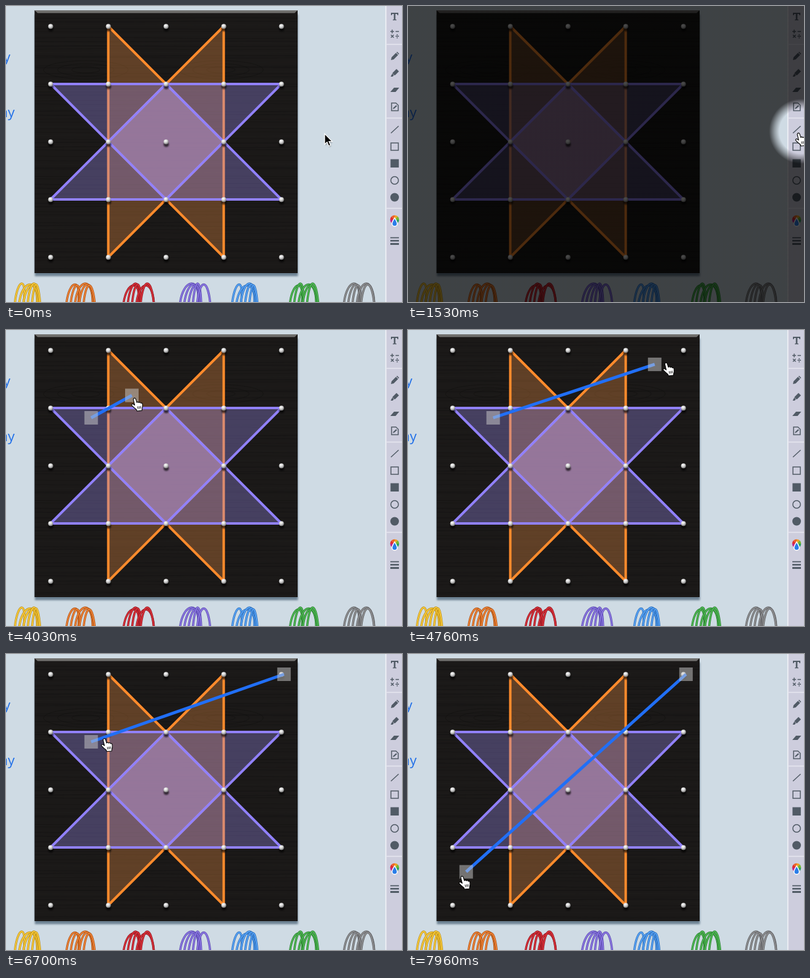
These frames come from a looping animation (645x482 px, 8 s). An HTML page:

```html
<!DOCTYPE html>
<html lang="en">
<head>
<meta charset="utf-8">
<title>Geoboard line tool</title>
<style>
html, body { margin: 0; width: 100%; height: 100%; overflow: hidden; background: #cfdbe4; }
svg { position: absolute; left: 0; top: 0; display: block; }
.label { font: 22px "Open Sans", sans-serif; fill: #1f6ee8; text-anchor: end; }
.solid { fill: #515b66; }
.outline { fill: none; stroke: #515b66; stroke-width: 1.5; }
.handle { fill: #cdcdcd; fill-opacity: .5; }
.orange { fill: #ff9d4b; fill-opacity: .3; stroke: #ff8b2c; stroke-width: 4; stroke-linejoin: round; }
.purple { fill: #988bea; fill-opacity: .34; }
.purpleEdge { fill: none; stroke: #9181fb; stroke-width: 4; stroke-linejoin: round; }
</style>
</head>
<body>
<svg id="stage" width="645" height="482" viewBox="0 0 645 482">
  <defs>
    <radialGradient id="pin" cx=".4" cy=".3" r=".7">
      <stop offset="0" stop-color="#fff"/>
      <stop offset=".5" stop-color="#d2d2d2"/>
      <stop offset="1" stop-color="#777"/>
    </radialGradient>
    <radialGradient id="spot" gradientUnits="userSpaceOnUse" cx="0" cy="0" r="53">
      <stop offset=".68" stop-color="#000" stop-opacity="0"/>
      <stop offset=".83" stop-color="#000" stop-opacity=".3"/>
      <stop offset="1" stop-color="#000" stop-opacity=".7"/>
    </radialGradient>
    <filter id="soft" x="-20%" y="-20%" width="140%" height="140%"><feGaussianBlur stdDeviation="1.4"/></filter>
    <filter id="blur" x="-50%" y="-50%" width="200%" height="200%"><feGaussianBlur stdDeviation="1.2"/></filter>
    <clipPath id="boardClip"><path d="M47 12H475V435H47Z"/></clipPath>
  </defs>

  <rect width="645" height="482" fill="#cfdbe4"/>
  <text class="label" x="7" y="90.5">y</text>
  <text class="label" x="14" y="181">ay</text>

  <rect x="47" y="14" width="428.5" height="426" fill="#5d7385" opacity=".85" filter="url(#soft)"/>
  <rect x="46.5" y="7" width="428.5" height="428" fill="#1b1918"/>
  <path d="M46.5 7H475L470 11.5H51.5Z" fill="#706f6d"/>
  <g id="grain" clip-path="url(#boardClip)" fill="none"></g>

  <g transform="translate(-.4 0)">
    <path class="orange" d="M167 33V409L355 221Z"/>
    <path class="orange" d="M355 33V409L167 221Z"/>
    <path class="purple" d="M73 127H449L261 315Z"/>
    <path class="purple" d="M73 315H449L261 127Z"/>
    <path class="purpleEdge" d="M73 127H449L261 315ZM73 315H449L261 127Z"/>
  </g>
  <g id="pins"></g>
  <g id="bands" fill="none"></g>

  <rect x="619" width="26" height="482" fill="#cdcddd"/>
  <path d="M618.7 0V482" stroke="#f2f4f8" stroke-width="1.6"/>
  <path d="M620 62.5H645M620 182.5H645M620 329.5H645" stroke="#e6e6f0" stroke-width="1.4"/>
  <g id="tools">
    <path class="solid" d="M627 11H639V15H637.6L637 13H634.3V21.8L636 22.2V23.3H630V22.2L631.7 21.8V13H629L628.4 15H627Z"/>
    <path class="outline" d="M626 41.5H632M629 38.5V44.5M634.5 41.5H640M627 47L631.5 51.5M631.5 47L627 51.5M634.5 49.3H640"/>
    <path class="solid" d="M636.3 46h1.8v1.5h-1.8zM636.3 51h1.8v1.5h-1.8z"/>
    <path class="solid" d="M627 88L628 83.5L635.2 76.3L638.7 79.8L631.5 87ZM636 75.5L637.2 74.6L640.3 77.8L639.4 79Z"/>
    <path class="solid" d="M626.5 115L630 108.5L636 102.5L640 106.5L634 112.5L631 113.3L630 115Z"/>
    <path d="M629 109.5L633 113.5" stroke="#cdcddd" stroke-width=".7"/>
    <path class="solid" d="M626 140L632 133H640.5L634.5 140Z"/>
    <path class="outline" d="M628 158H635L638.8 161.5V170.5H628Z"/>
    <path class="solid" d="M630 168L631 165.5L635.5 161.5L637 163L632.5 167Z"/>
    <path class="outline" d="M627 207L639.5 195.5"/>
    <rect class="outline" x="627" y="223" width="12" height="12"/>
    <rect class="solid" x="626.3" y="249.5" width="13.5" height="13.5"/>
    <circle class="outline" cx="633" cy="284" r="6.2"/>
    <circle class="solid" cx="633" cy="311.5" r="7"/>
    <g id="wheel"></g>
    <path d="M633 345C635 348.5 637.3 351.5 637.3 354.5A4.3 4.3 0 0 1 628.7 354.5C628.7 351.5 631 348.5 633 345Z" fill="#2a7de8" stroke="#fff" stroke-width="1.5"/>
    <path class="solid" d="M626 376.5h14v1.8h-14zM626 381h14v2.6h-14zM626 386h14v3h-14z"/>
  </g>

  <g id="line">
    <path id="segment" fill="none" stroke="#216ff6" stroke-width="5"/>
    <rect id="tail" class="handle" x="-11" y="-11" width="22" height="22"/>
    <rect id="head" class="handle" x="-11" y="-11" width="22" height="22"/>
  </g>

  <g id="arrow">
    <path d="M1 2V19L5 15.5L7.5 21.5L10.5 20L8 14.5H13Z" fill="#000" opacity=".35" filter="url(#blur)"/>
    <path d="M0 0V17.3L4 13.7L6.6 20L9.7 18.7L7.1 12.6H12.4Z" fill="#000" stroke="#fff" stroke-width="1.3"/>
  </g>
  <g id="hand">
    <path d="M-2 2C-1.8 -.6 1.2 -.8 2 1.4L3.8 7.2C4.4 5.7 6.6 5.8 7 7.4C7.9 6.2 9.8 6.6 10.2 8.2C11.4 7.4 12.8 8.2 12.9 9.7C13.3 12.4 13.3 14.4 12.4 17L12 20.2L4 21L3 18.5C1 17 -2 14.5 -4.4 11.8C-5.4 10.2 -3.5 8.8 -2 9.8L.3 11.4Z" fill="#fff" stroke="#000" stroke-width="1.1" stroke-linejoin="round"/>
    <path d="M5 13.5L5.8 17.5M7.5 13.2L8 17.2M9.8 12.8L10.1 16.8" stroke="#000" stroke-width=".9"/>
  </g>
  <rect id="dim" x="-700" y="-600" width="1400" height="1200" fill="url(#spot)"/>
</svg>
<script>
const $ = id => document.getElementById(id);
const add = (parent, tag, attrs) => {
  const el = document.createElementNS('http://www.w3.org/2000/svg', tag);
  for (const key in attrs) el.setAttribute(key, attrs[key]);
  $(parent).appendChild(el);
};

let seed = 7;
const rand = () => (seed = seed * 16807 % 2147483647) / 2147483647;

// Wood grain with two faint knots
for (let i = 0; i < 85; i++) {
  const y = 14 + i * 5 + rand() * 4, bend = rand() * 5 - 2.5;
  add('grain', 'path', {
    d: `M47 ${y}q107 ${bend} 214 0t214 0`,
    stroke: i % 3 ? '#11100f' : '#22201e', 'stroke-width': .6 + rand(), opacity: .35
  });
}
for (const x of [130, 350]) for (let i = 1; i < 4; i++)
  add('grain', 'ellipse', { cx: x, cy: 104, rx: 23 * i, ry: 5 * i, stroke: '#11100f', opacity: .5 });

for (let y = 33; y < 420; y += 94) for (let x = 73; x < 460; x += 94) {
  add('pins', 'ellipse', { cx: x, cy: y + 4.5, rx: 4.4, ry: 4, fill: '#000', opacity: .65, filter: 'url(#blur)' });
  add('pins', 'circle', { cx: x - .3, cy: y + .2, r: 4, fill: 'url(#pin)' });
}

// Rubber bands: [centre, colour, shade]
const bands = [
  [39, '#f8cb3c', '#b98a12'], [123, '#ee8236', '#a84f12'], [216, '#d83039', '#8f1720'],
  [308, '#8a76e2', '#5544a8'], [393, '#58a3f6', '#2769b4'], [487, '#4fb954', '#267a2b'],
  [575, '#8d8e90', '#5c5d60']
];
bands.forEach(([x, colour, shade], n) => {
  for (let i = 0; i < 5; i++) {
    const left = x - 25 + i * 7;
    const right = Math.min(x + 25, left + 14 + (i * 3 + n) % 4 * 5);
    const top = 441 + (i + n) % 3 * 2;
    const d = `M${left} 488C${left + 4} ${top} ${right + 8 - i * 3} ${top - 2} ${right} 488`;
    add('bands', 'path', { d, stroke: shade, 'stroke-width': 3.4 });
    add('bands', 'path', { d, stroke: colour, 'stroke-width': 2 });
  }
});

['#f0a020', '#74b82e', '#2aa05a', '#2870d8', '#5c3cb0', '#c02888', '#e03030', '#ee6428'].forEach((fill, i) => {
  const at = a => `${633 + 7.3 * Math.sin(a)} ${348 - 7.3 * Math.cos(a)}`;
  const a = i * Math.PI / 4;
  add('wheel', 'path', { d: `M633 348L${at(a)}A7.3 7.3 0 0 1 ${at(a + Math.PI / 4)}Z`, fill });
});

const clamp = v => Math.min(1, Math.max(0, v));
const quad = p => p < .5 ? 2 * p * p : 1 - 2 * (1 - p) ** 2;
const settle = p => 1 - (1 - p * p) ** 8;
const progress = (t, m) => m.ease(clamp((t - m.from) / (m.to - m.from)));
const travel = (a, b, p, sag = 0) =>
  [a[0] + (b[0] - a[0]) * p, a[1] + (b[1] - a[1]) * p + 4 * sag * p * (1 - p)];

const dragHead = { from: 4010, to: 5630, end: [456, 37], ease: settle, sag: 12 };
const dragTail = { from: 7216, to: 7936, end: [88, 362], ease: quad };
const moves = [
  { from: 1015, to: 1530, end: [636, 207], ease: quad },
  { from: 2620, to: 3630, end: [209, 111], ease: quad },
  dragHead,
  { from: 6200, to: 6830, end: [133, 147], ease: quad },
  dragTail
];
const LAG = 65;

function cursorAt(t) {
  let pos = [519, 208];
  for (const m of moves) {
    if (t < m.from) break;
    pos = travel(pos, m.end, progress(t, m), m.sag);
  }
  return pos;
}

const place = (id, [x, y]) => $(id).setAttribute('transform', `translate(${x} ${y})`);
const show = (id, on) => $(id).setAttribute('visibility', on ? 'visible' : 'hidden');

function draw(t) {
  const pos = cursorAt(t);
  const pointing = pos[0] > 618 || (t > 3000 && pos[0] < 217) || t >= 3630;
  place('arrow', pos);
  place('hand', pos);
  show('arrow', !pointing);
  show('hand', pointing);

  place('dim', [pos[0] + 5, pos[1] - 3]);
  $('dim').setAttribute('opacity', t < 2230 ? clamp((t - 1015) / 515) : 0);

  const tail = travel([138.7, 143], [94.5, 356], progress(t - LAG, dragTail));
  const head = travel([205, 106.5], [452.8, 33], progress(t - LAG, dragHead), dragHead.sag);
  show('line', t >= 2400);
  place('tail', tail);
  place('head', head);
  $('segment').setAttribute('d', `M${tail}L${head}`);
}

const start = performance.now();
function tick() {
  draw((performance.now() - start) % 8000);
  requestAnimationFrame(tick);
}
tick();
</script>
</body>
</html>
```
